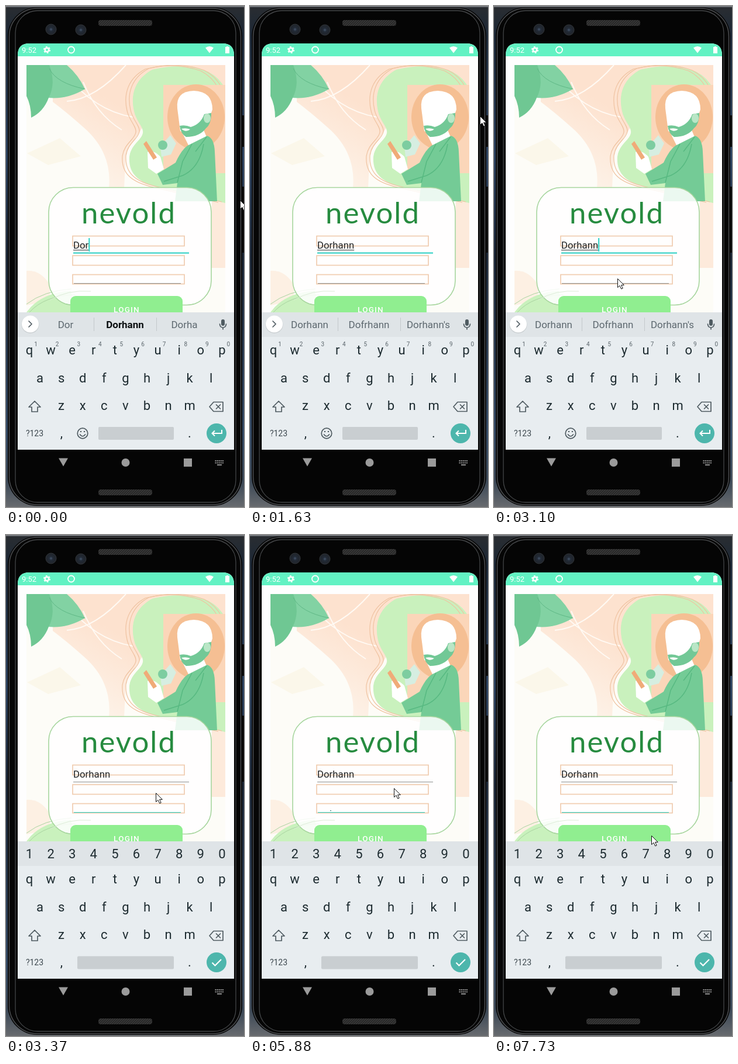
Recreate the animation shown at these times as an HTML page. Size 407 by 857 pixels, loop 8 s.

```html
<!DOCTYPE html>
<html lang="en">
<head>
<meta charset="utf-8">
<title>Login screen</title>
<style>
  html, body { margin: 0; width: 100%; height: 100%; overflow: hidden; background: #000; }
  svg { display: block; width: 407px; height: 857px; font-family: Roboto, sans-serif; }
  .mid { text-anchor: middle; }
  .key { font-size: 22px; fill: #1d2b30; }
  .sup { font-size: 10px; fill: #5b656b; }
  .hint { font-size: 17px; fill: #5d686f; }
  .bold { font-weight: 700; fill: #0b0f11; }
  .icon { fill: none; stroke: #4f5b61; stroke-width: 1.7; stroke-linejoin: round; stroke-linecap: round; }
</style>
</head>
<body>
<svg viewBox="0 0 407 857">
  <defs>
    <linearGradient id="desk" x2="0" y2="1">
      <stop offset="0" stop-color="#2a2d31"/><stop offset=".06" stop-color="#1b2736"/>
      <stop offset=".3" stop-color="#2c4260"/><stop offset=".5" stop-color="#1a2535"/>
      <stop offset=".85" stop-color="#344a66"/><stop offset=".95" stop-color="#3c4856"/>
      <stop offset="1" stop-color="#686b6f"/>
    </linearGradient>
    <linearGradient id="blush" x1="1" y1="0" x2=".35" y2="1">
      <stop offset=".45" stop-color="#fde2cf"/><stop offset="1" stop-color="#fdf3e9"/>
    </linearGradient>
    <pattern id="mesh" width="4" height="4" patternUnits="userSpaceOnUse">
      <rect width="4" height="4" fill="#363636"/><path d="M0 4L4 0" stroke="#1b1b1b"/>
    </pattern>
    <radialGradient id="lens"><stop offset="0" stop-color="#46566c"/><stop offset=".35" stop-color="#222a36"/><stop offset="1" stop-color="#20242a"/></radialGradient>
    <clipPath id="screen"><path d="M20 759V84Q20 64 40 64H370Q390 64 390 84V759Z"/></clipPath>
    <clipPath id="art"><rect x="35" y="101" width="340" height="423"/></clipPath>
    <path id="blob" d="M375 337Q318 324 264 311C230 303 209 290 211 258C214 236 232 230 234 217C236 208 222 196 219 180C212 150 222 124 250 109Q300 96 345 112Q365 122 375 142"/>
  </defs>

  <!-- device -->
  <rect width="407" height="857" fill="url(#desk)"/>
  <path d="M0 1H407" stroke="#8b8f94" stroke-width="1.5"/>
  <path d="M405 187V241M405 309V422" stroke="#0a0a0a" stroke-width="4"/>
  <rect x="3" y="2" width="401" height="853" rx="50" fill="#060606"/>
  <rect x="5.500" y="4" width="396" height="849" rx="48" fill="none" stroke="#4c4e51" stroke-width="1.500"/>
  <rect x="16" y="8" width="377" height="841" rx="38" fill="#050505" stroke="#434547" stroke-width="1.300"/>
  <rect x="158" y="24" width="92" height="10" rx="4" fill="url(#mesh)"/>
  <rect x="158" y="827" width="92" height="10" rx="4" fill="url(#mesh)"/>
  <g fill="url(#lens)" stroke="#33373c">
    <circle cx="77" cy="40" r="9"/><circle cx="128" cy="41" r="9"/>
  </g>

  <g clip-path="url(#screen)">
    <rect x="20" y="64" width="370" height="695" fill="#fefefe"/>
    <rect x="20" y="64" width="370" height="22" fill="#62f2c3"/>
    <g fill="#fff">
      <text x="27" y="80" font-size="13">9:52</text>
      <circle cx="70" cy="75" r="3.300" fill="none" stroke="#fff" stroke-width="2.600"/>
      <circle cx="70" cy="75" r="5.200" fill="none" stroke="#fff" stroke-width="1.800" stroke-dasharray="2.700 2.750"/>
      <circle cx="111.500" cy="75" r="5.500" fill="none" stroke="#fff" stroke-width="1.800"/>
      <path d="M341 71.500Q348 66.500 355 71.500L348 80.500ZM375 70H377V69H380V70H382V81H375Z"/>
    </g>

    <!-- artwork -->
    <g clip-path="url(#art)">
      <rect x="35" y="101" width="340" height="423" fill="#fdfcf7"/>
      <path d="M80 101H300L228 216L205 250L202 311H176Q182 250 132 207Q104 182 80 164Z" fill="url(#blush)"/>
      <path d="M36 252L92 226L128 257L72 272Z" fill="#fbf7ea"/>
      <path d="M240 101H375V150H240Z" fill="#fde2cf"/>
      <path d="M352 325H375V448H351Z" fill="#fdeadb"/>
      <use href="#blob" fill="#c9f1bd"/>
      <path d="M104 163Q154 159 205 101M100 114Q150 179 217 190M132 130Q154 185 198 212" fill="none" stroke="#fffaf4" stroke-width="2"/>
      <g fill="none" stroke="#efc2a0" stroke-width="1.200">
        <use href="#blob" x="-6" y="-2"/>
        <use href="#blob" x="-12" y="-1"/>
      </g>
      <path d="M269 135H375V286H269Z" fill="#fbd6b9"/>
      <ellipse cx="325" cy="190" rx="49" ry="56" fill="#f5bf93"/>
      <!-- figure -->
      <path d="M302 218L332 198L343 224L318 250Z" fill="#fff"/>
      <path d="M293 175Q290 146 321 145Q353 146 353 177L343 206L318 221L298 214Z" fill="#fff"/>
      <path d="M297 205Q307 203 316 207Q333 202 339 185L351 183Q351 202 342 209Q331 224 308 224Q299 219 297 205Z" fill="#72c896"/>
      <path d="M300 210Q308 208 315 211Q307 217 300 210Z" fill="#fff"/>
      <ellipse cx="344" cy="192" rx="6" ry="8" fill="#b9e6c6"/>
      <path d="M316 236L344 222Q356 226 357 249L361 334H289L293 303L268 306L259 287L290 268Q302 241 316 236Z" fill="#74cb96"/>
      <path d="M318 236L302 266L293 302M338 236Q331 277 302 290L270 300M343 224L324 249" fill="none" stroke="#57b981" stroke-width="1.500"/>
      <path d="M264 240L281 221L291 235L282 254L266 258Z" fill="#d6eee1"/>
      <circle cx="268" cy="238" r="8" fill="#7dcda0"/>
      <path d="M242 250Q252 245 264 258L270 279L257 287L243 277Z" fill="#fff"/>
      <path d="M235 236L240 231L258 259L252 263Z" fill="#f0ab78"/>
      <!-- leaves -->
      <path d="M74 101H104Q124 118 135 142Q105 160 73 157Z" fill="#82d2a3"/>
      <path d="M35 101H74Q86 132 73 157Q64 181 43 191Q43 170 35 154Z" fill="#6fc793"/>
      <path d="M74 107Q86 132 135 142" fill="none" stroke="#5fb886"/>
      <path d="M35 453Q59 451 75 477V504L35 512Z" fill="#fdf0e3"/>
      <path d="M35 524Q58 491 111 487L120 524Z" fill="#c9f1bd"/>
      <path d="M35 510Q65 487 112 484M40 524Q66 495 119 494" fill="none" stroke="#a9d3a0"/>
    </g>

    <!-- form -->
    <rect x="73" y="310.500" width="278" height="201" rx="42" fill="#fff" fill-opacity=".86" stroke="#a6d59d" stroke-width="1.600"/>
    <path d="M75 503Q105 485 145 488" fill="none" stroke="#dcecd7"/>
    <text x="210" y="372" class="mid" font-size="51" letter-spacing="2" fill="#268b3f" font-family="Lato, sans-serif">nevold</text>
    <g fill="none" stroke="#f0ccaf" stroke-width="1.700">
      <rect x="114" y="393.500" width="191" height="17"/>
      <rect x="114" y="427" width="191" height="16.500"/>
      <rect x="114" y="459.500" width="191" height="16"/>
    </g>
    <text id="name" x="115" y="415" font-size="16.800" fill="#202223"></text>
    <rect id="compose" x="115" y="417" height="1" fill="#333"/>
    <rect id="caret" y="397" width="2" height="23" fill="#28cfc3"/>
    <rect id="line1" x="115"/>
    <rect id="line2" x="116" y="474" width="183" height="1"/>
    <rect id="dot" y="471" width="2" height="1" fill="#32776f"/>
    <rect x="110" y="496" width="192" height="44" rx="9" fill="#90ee90"/>
    <text x="206.500" y="524" class="mid" font-size="13.500" font-weight="500" letter-spacing="1.200" fill="#fff">LOGIN</text>

    <!-- keyboard -->
    <rect x="20" y="524" width="370" height="235" fill="#e8edf0"/>
    <rect x="20" y="524" width="370" height="42" fill="#dfe4e7"/>
    <g id="keys"></g>
    <g class="icon">
      <path d="M49 676L59 686H54V694H44V686H39Z"/>
      <path d="M355 677.500H371V693.500H355L348 685.500ZM359.500 682L366.500 689M366.500 682L359.500 689"/>
    </g>
    <text x="49" y="736" class="mid" font-size="14" fill="#3d484e">?123</text>
    <circle cx="360" cy="731" r="17" fill="#4db6ac"/>
    <g id="words">
      <circle cx="41.500" cy="545" r="15" fill="#c9ced1"/>
      <circle cx="41.500" cy="544" r="14.500" fill="#fff"/>
      <path class="icon" d="M39 539L44 544L39 549"/>
      <path d="M150.500 533V556M257.500 533V556" stroke="#c3c8cb"/>
      <text class="hint mid" x="102" y="551"></text>
      <text class="hint mid" x="203.500" y="551"></text>
      <text class="hint mid" x="305" y="551"></text>
      <rect x="368" y="536" width="6" height="11" rx="3" fill="#4f5b61"/>
      <path class="icon" d="M365.500 544Q366 550 371 550T376.500 544M371 550V553"/>
      <g id="sups"></g>
      <circle class="icon" cx="131" cy="731" r="8.800"/>
      <path class="icon" d="M126.500 733Q131 739 135.500 733"/>
      <path d="M128 727V729M134 727V729" stroke="#4f5b61" stroke-width="2.200"/>
      <rect x="158" y="720" width="129" height="22" rx="2" fill="#c9ced1"/>
      <path d="M369 725V731H353M357 726.500L352.500 731L357 735.500" fill="none" stroke="#fff" stroke-width="2"/>
    </g>
    <g id="digits">
      <rect x="122" y="720.500" width="165" height="22" rx="2" fill="#c9ced1"/>
      <path d="M352.500 731.500L357.500 736.500L368 726" fill="none" stroke="#fff" stroke-width="2.200"/>
    </g>
  </g>

  <!-- navigation -->
  <g fill="#9b9b9b">
    <path d="M90 773.500H106L98 787.500Z"/>
    <circle cx="204.500" cy="781" r="7"/>
    <rect x="304" y="774" width="14" height="14"/>
    <path d="M357.500 778H372M357.500 781.500H372" fill="none" stroke="#9b9b9b" stroke-width="2" stroke-dasharray="2 1.100"/>
    <path d="M361 785H369" stroke="#9b9b9b" stroke-width="1.800"/>
  </g>
  <path id="mouse" d="M.5 .5V15.500L4 12.300L6.700 18L9.200 17L6.600 11.400H11.300Z" fill="#fff" stroke="#111"/>
</svg>
<script>
const LOOP = 8000;
const $ = id => document.getElementById(id);

// Each row: start time, then the values held until the next row.
const typing = [
  [0, "Dor", "Dor", "Dorhann", "Dorha"],
  [120, "Dorh", "Dorh", "Dorhann", "Dorha"],
  [370, "Dorha", "Dorha", "Dorhann", "Dorhas"],
  [520, "Dorhan", "Dorhan", "Dorhann", "Dorhann's"],
  [800, "Dorhann", "Dorhann", "Dofrhann", "Dorhann's"]
];
const blink = [[0, 1], [1200, 0], [1750, 1], [2290, 0], [2680, 1], [3250, 0]];
const dots = [[0, 0], [4310, 116], [4740, 0], [5240, 131], [5610, 136], [5880, 137],
  [6280, 148], [6680, 0], [7090, 148], [7730, 0]];
const moves = [
  [0, 400, 332], [1480, 420, 300], [1630, 393, 188], [1750, 290, 328], [1870, 186, 431],
  [2020, 178, 442], [2140, 183, 449], [2290, 188, 456], [2560, 202, 459], [2680, 214, 460],
  [2800, 223, 461], [2950, 213, 471], [3100, 211, 466], [3250, 228, 456], [3370, 256, 441],
  [3490, 253, 438], [3610, 249, 435], [3740, 246, 433], [6680, 240, 460], [6810, 233, 487],
  [6950, 253, 502], [7090, 262, 509], [7220, 269, 514]
];
const FOCUS = 3250, SWAP = 3370;
const TEAL = "#28cfc3", GREY = "#8d9190";

const at = (rows, t) => rows.findLast(row => row[0] <= t);
const show = (el, on) => el.setAttribute("visibility", on ? "visible" : "hidden");
const set = (el, attrs) => { for (const k in attrs) el.setAttribute(k, attrs[k]); };

function row(group, chars, x, y, cls) {
  [...chars].forEach((c, i) => {
    const el = document.createElementNS("http://www.w3.org/2000/svg", "text");
    set(el, { x: x + i * 36.6, y, class: cls + " mid" });
    el.textContent = c;
    group.append(el);
  });
}
row($("keys"), "qwertyuiop", 40, 596, "key");
row($("keys"), "asdfghjkl", 58, 644, "key");
row($("keys"), "zxcvbnm", 94.5, 691, "key");
row($("keys"), ",", 95, 738, "key");
row($("keys"), ".", 314, 738, "key");
row($("sups"), "1234567890", 51, 582, "sup");
row($("digits"), "1234567890", 40, 553, "key");

const hints = document.querySelectorAll(".hint");

function draw(now) {
  const t = now % LOOP;
  const [, text, ...words] = at(typing, t);
  const first = t < FOCUS;
  $("name").textContent = text;
  const width = $("name").getComputedTextLength();
  set($("compose"), { width });
  set($("caret"), { x: 115 + width });
  show($("compose"), first);
  show($("caret"), at(blink, t)[1]);
  set($("line1"), { y: first ? 421.5 : 422, width: 198, height: first ? 2 : 1, fill: first ? TEAL : GREY });
  set($("line2"), { fill: first ? GREY : TEAL });

  hints.forEach((el, i) => el.textContent = words[i]);
  hints[1].classList.toggle("bold", t < 800);
  show($("words"), t < SWAP);
  show($("digits"), t >= SWAP);

  const dot = at(dots, t)[1];
  set($("dot"), { x: dot });
  show($("dot"), dot);
  const [, x, y] = at(moves, t);
  set($("mouse"), { transform: `translate(${x} ${y})` });
}

const start = performance.now();
function tick() {
  draw(performance.now() - start);
  requestAnimationFrame(tick);
}
tick();
</script>
</body>
</html>
```
